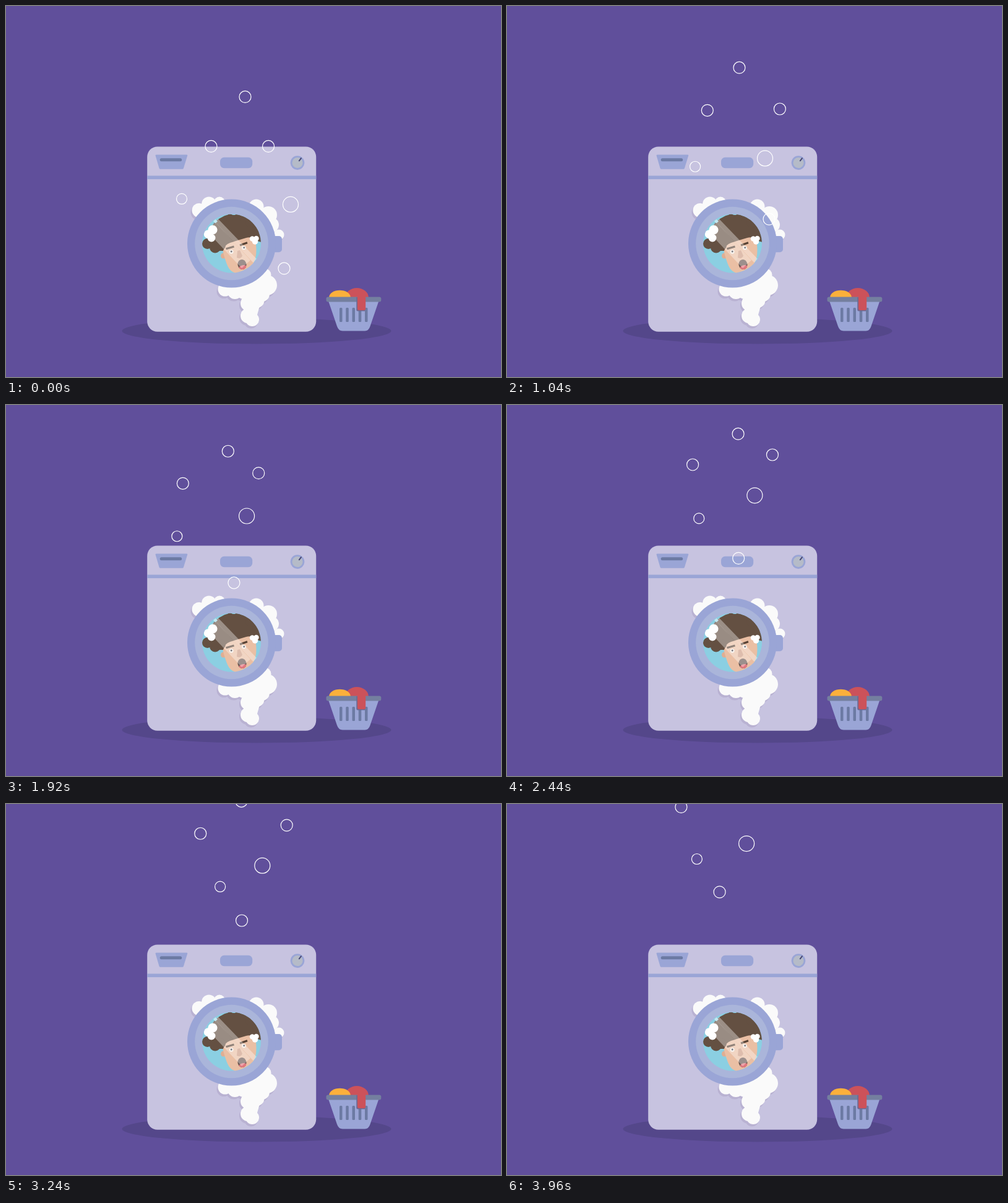
An HTML page for the animation above (4 s loop, 800x600 px).

```html
<!DOCTYPE html>
<html lang="en">
<head>
<meta charset="utf-8">
<title>Washing machine</title>
<style>
  html, body { margin: 0; width: 100%; height: 100%; overflow: hidden; background: #604f9b; }
  svg { display: block; width: 100%; height: 100%; }
</style>
</head>
<body>
<svg id="stage" viewBox="0 0 800 600">
  <defs>
    <clipPath id="glass"><circle cx="364.5" cy="384" r="47.5"/></clipPath>
    <g id="foam">
      <circle cx="312" cy="330.5" r="11.5"/>
      <circle cx="328" cy="320.5" r="12"/>
      <circle cx="345" cy="317.5" r="9"/>
      <circle cx="404.500" cy="324.500" r="12"/>
      <circle cx="424" cy="338" r="14"/>
      <circle cx="429" cy="354" r="12"/>
      <circle cx="441" cy="370" r="8.500"/>
      <circle cx="354" cy="458" r="11.5"/>
      <circle cx="370" cy="462" r="12"/>
      <circle cx="421.500" cy="451.500" r="16.500"/>
      <circle cx="418" cy="435" r="10.500"/>
      <circle cx="414" cy="466" r="12"/>
      <circle cx="405" cy="476" r="12.500"/>
      <circle cx="391" cy="481" r="12"/>
      <circle cx="391" cy="501" r="12"/>
      <circle cx="398" cy="507" r="11"/>
      <path d="M360 440H425L412 478L405 503H386L382 474L360 465Z"/>
    </g>
  </defs>

  <rect width="800" height="600" fill="#604f9b"/>
  <ellipse cx="405" cy="525.5" rx="217.500" ry="21" fill="#54478a"/>

  <!-- machine body and panel -->
  <rect x="228.200" y="227.500" width="273" height="299.300" rx="16.500" fill="#c7c3e0"/>
  <g fill="#9aa5d6">
    <rect x="228.200" y="274.500" width="273" height="5.600"/>
    <path d="M243 240.500H292Q293.700 240.500 293.200 242L287 262.200Q286.500 263.800 285 263.800H249.500Q248 263.800 247.500 262.200L241.600 242Q241.200 240.500 243 240.500Z"/>
    <rect x="346" y="244.800" width="52.200" height="17.400" rx="6.500"/>
    <circle cx="471" cy="253.600" r="11.300"/>
  </g>
  <rect x="248.700" y="246.300" width="35.500" height="5" rx="2.500" fill="#6c7aa3"/>
  <circle cx="471" cy="253.600" r="8.500" fill="#b5bbc8"/>
  <path d="M473.800 250.300L477 246.200" stroke="#474775" stroke-width="2" stroke-linecap="round"/>

  <!-- foam and door -->
  <use href="#foam" x="-2" y="3.500" fill="#b9b2d2"/>
  <use href="#foam" fill="#fafafa"/>
  <rect x="424" y="372" width="22" height="26.300" rx="5" fill="#9aa5d6"/>
  <circle cx="364.500" cy="384" r="71.500" fill="#9aa5d6"/>
  <circle cx="364.500" cy="384" r="59.300" fill="#aab5da"/>
  <circle cx="364.500" cy="384" r="47.500" fill="#8bcfe2"/>

  <g clip-path="url(#glass)">
    <circle cx="351.500" cy="404" r="4.500" fill="#dfae93"/>
    <path d="M350 386L398 368L404 386Q406 404 400 416Q392 432 376 433Q364 432 359 422Q354 412 350 394Z" fill="#eabfa4"/>
    <g fill="#645042">
      <path d="M326 376Q330 350 350 341Q357 336 368 338Q384 337 397 347Q408 355 411 366L413 382L406 380Q396 372 388 375Q371 380 362 383Q353 386 351 396L340 396L322 388Z"/>
      <circle cx="325.500" cy="384.500" r="8.500"/>
      <circle cx="338" cy="390.500" r="9"/>
      <circle cx="347" cy="387" r="8"/>
      <circle cx="362" cy="343" r="6.500"/>
      <circle cx="374" cy="343" r="6.500"/>
      <circle cx="395" cy="351" r="7.500"/>
      <circle cx="405" cy="361" r="6.500"/>
    </g>
    <path d="M355.500 392.800L368.500 389M378 387L390 382.800" stroke="#584335" stroke-width="3.200"/>
    <circle cx="364.200" cy="397.500" r="3.300" fill="#f6efe8"/>
    <circle cx="384.500" cy="391" r="3.300" fill="#f6efe8"/>
    <circle cx="364.200" cy="397" r="1.500" fill="#3d3941"/>
    <circle cx="384.700" cy="390.800" r="1.500" fill="#3d3941"/>
    <path d="M374 396L378 395L382 404Q379 410 373 407Z" fill="#cc9b83"/>
    <g transform="rotate(-14 381.500 418)">
      <ellipse cx="381.500" cy="418" rx="7" ry="8" fill="#695550"/>
      <path d="M375.300 421.500Q381.500 417 387.700 421.500Q386 426 381.500 426Q377 426 375.300 421.500Z" fill="#e2777f"/>
    </g>
    <g fill="#fff">
      <path d="M331 356L339 350L395 411L381 424L331 371Z" opacity=".34"/>
      <path d="M337.500 349L343 344.500L405 409L399.500 415Z" opacity=".36"/>
      <circle cx="334" cy="362" r="7.600"/>
      <circle cx="326.500" cy="369" r="6.700"/>
      <circle cx="332" cy="375" r="6.500"/>
      <circle cx="398" cy="376.500" r="4.200"/>
      <circle cx="404.500" cy="376" r="4.200"/>
      <circle cx="402.500" cy="381" r="4.700"/>
    </g>
    <path d="M335 348L338.500 345L342 348.500L338 351.500Z" fill="#c2e7f1"/>
  </g>

  <!-- laundry basket -->
  <ellipse cx="567" cy="471" rx="18.800" ry="15" fill="#cc525a"/>
  <ellipse cx="539.500" cy="471" rx="17.300" ry="11.300" fill="#fbb03b"/>
  <path d="M521 477H602.500L588.500 518Q586 525.500 580 525.500H544Q537.500 525.500 535 518Z" fill="#9aa5d6"/>
  <g id="slots" fill="#6c7aa3"></g>
  <rect x="517.500" y="470.500" width="88.800" height="7.900" rx="3" fill="#747f9f"/>
  <path d="M566.300 471H580V493.500H568.300Q566.300 493.500 566.300 491.500Z" fill="#6f6890"/>
  <path d="M568 468H581.200V489.500Q581.200 492 578.700 492H570.500Q568 492 568 489.500Z" fill="#cc525a"/>

  <g id="bubbles" fill="none" stroke="#fff" stroke-width="1.200"></g>
</svg>
<script>
const NS = 'http://www.w3.org/2000/svg';
const LOOP = 4000, STEP = 1000;

function add(parent, tag, attrs) {
  const el = document.createElementNS(NS, tag);
  for (const k in attrs) el.setAttribute(k, attrs[k]);
  if (parent) parent.appendChild(el);
  return el;
}

const slots = document.getElementById('slots');
for (let i = 0; i < 5; i++) {
  add(slots, 'rect', { x: 539 + i * 10.25, y: 488, width: 4.5, height: 23, rx: 1.5 });
}

// One waypoint per second; each leg runs at a constant speed.
const bubbles = [
  { r: 9.5, pts: [[386.5, 147], [376, 101], [359, 72], [387.5, 13], [343, -51]] },
  { r: 9.5, pts: [[331.5, 227], [325, 171.2], [284.8, 121.8], [320, 64.7], [279.8, 2.5]] },
  { r: 9.5, pts: [[424, 227], [441.5, 169.5], [408, 104.3], [457, 51.7], [424, -13.5]] },
  { r: 12.5, pts: [[460, 321], [418.5, 249.5], [388.6, 173], [418.5, 114], [385.8, 62]] },
  { r: 8.5, pts: [[284, 312], [304.5, 262.3], [277.5, 207.4], [351, 152.5], [305, 86.4]] },
  { r: 9.5, pts: [[449.5, 424.5], [425.5, 347.8], [365.8, 280.9], [388.5, 206.8], [341.7, 139.8]] }
];

// Smooth curve through the waypoints, split into legs.
function makeLegs(pts) {
  const last = pts.length - 1;
  const slope = i => {
    const a = Math.max(i - 1, 0), b = Math.min(i + 1, last);
    return [0, 1].map(k => (pts[b][k] - pts[a][k]) / (b - a));
  };
  return pts.slice(0, last).map((p, i) => {
    const q = pts[i + 1], m = slope(i), n = slope(i + 1);
    const c1 = [p[0] + m[0] / 3, p[1] + m[1] / 3];
    const c2 = [q[0] - n[0] / 3, q[1] - n[1] / 3];
    const path = add(null, 'path', { d: `M${p}C${c1} ${c2} ${q}` });
    return { path, length: path.getTotalLength() };
  });
}

const layer = document.getElementById('bubbles');
for (const b of bubbles) {
  b.legs = makeLegs(b.pts);
  b.el = add(layer, 'circle', { r: b.r });
}

function draw(t) {
  const i = Math.floor(t / STEP), f = t / STEP - i;
  for (const { legs, el } of bubbles) {
    const p = legs[i].path.getPointAtLength(legs[i].length * f);
    el.setAttribute('cx', p.x);
    el.setAttribute('cy', p.y);
  }
}

const start = performance.now();
function tick() {
  draw((performance.now() - start) % LOOP);
  requestAnimationFrame(tick);
}
tick();
</script>
</body>
</html>
```
